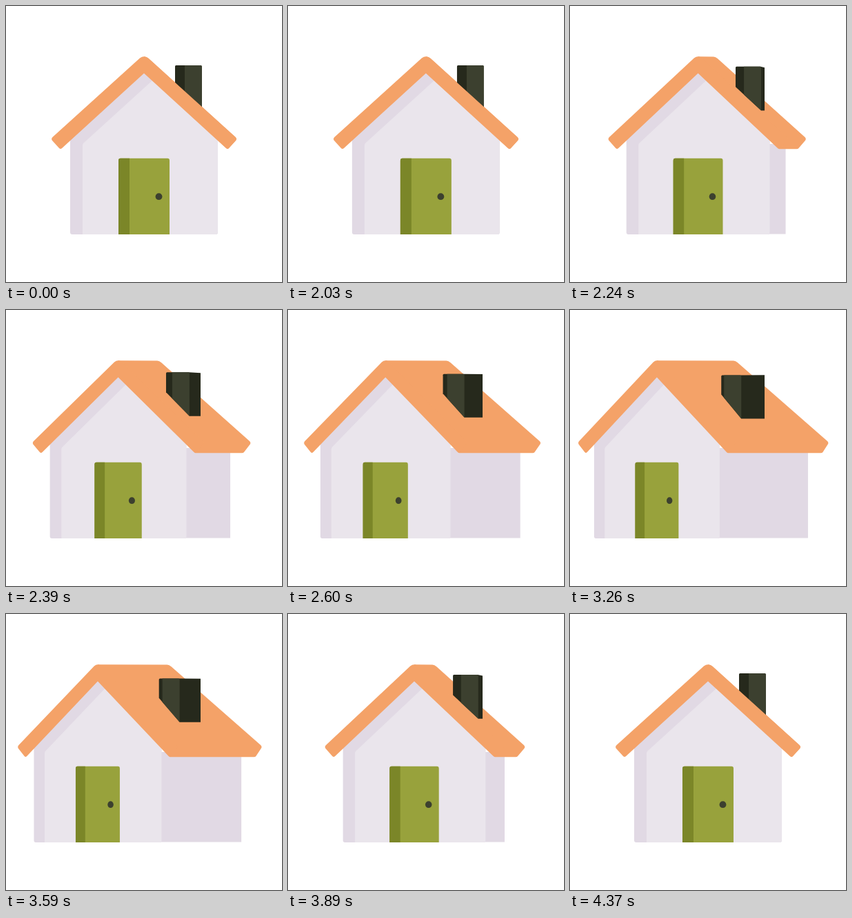
An HTML page that plays this animation: 400x400 px, repeating every 4400 ms.

```html
<!DOCTYPE html>
<html>
<head>
<meta charset="utf-8">
<style>
  html, body { margin: 0; width: 100%; height: 100%; overflow: hidden; background: #fff; }
  svg { display: block; width: 100%; height: 100%; }
</style>
</head>
<body>
<svg viewBox="0 0 400 400">
  <path id="sideWall" fill="#e1d9e4"/>
  <path id="sideRoof" fill="#f4a268"/>
  <path id="chimneyDark" fill="#26291c"/>
  <path id="chimneyLight" fill="#3c402f"/>
  <g id="front">
    <path fill="#e1d9e4" d="M93 188L200 92L307 188V328Q307 331 304 331H96Q93 331 93 328Z"/>
    <path fill="#eae5ec" d="M111 331V202Q111 200 112.5 198.6L212 108L307 190V328Q307 331 304 331Z"/>
    <path fill="#98a23c" d="M163 331V224Q163 220.7 166 220.7H234Q237 220.7 237 224V331Z"/>
    <path fill="#7b8628" d="M163 331V224Q163 220.7 166 220.7H179V331Z"/>
    <circle fill="#3c402f" cx="221.5" cy="276.2" r="4.9"/>
    <path fill="#f4a268" d="M194 75.6Q200 71 206 75.6L332.5 190Q335 192.3 333 195L323 206Q321 208 318.8 206L200 97.5L81.2 206Q79 208 77 206L67 195Q65 192.3 67.5 190Z"/>
  </g>
</svg>
<script>
const LOOP = 4400, START = 2000, TURN = 1200;
const el = id => document.getElementById(id);
const draw = (id, d) => el(id).setAttribute('d', d);

// Cubic bezier easing with flat ends: control points (x1, 0) and (x2, 1)
function ease(x, x1, x2) {
  let lo = 0, hi = 1, s;
  for (let i = 0; i < 24; i++) {
    s = (lo + hi) / 2;
    const r = 1 - s;
    if (3 * r * r * s * x1 + 3 * r * s * s * x2 + s ** 3 < x) lo = s; else hi = s;
  }
  return s * s * (3 - 2 * s);
}

function turnAt(time) {
  const t = (time - START) / TURN;
  if (t <= 0) return 0;
  return t < 1 ? ease(t, 0.33, 0.2) : 1 - ease(t - 1, 0.8, 0.2);
}

function render(p) {
  const apex = 200 - 74.2 * p, scale = 1 - 0.15 * p;
  const frontX = x => apex + (x - 200) * scale;
  el('front').setAttribute('transform', `translate(${apex} 0) scale(${scale} 1) translate(-200 0)`);

  draw('sideWall', `M210 200H${304.7 + 40.3 * p}V330.5H210Z`);

  const ridge = 36 * p, tip = 40.5 * p, eave = 43.5 * p;
  draw('sideRoof', `M${apex} 73.3L${201 + ridge} 73.5Q${204 + ridge} 73.5 ${207 + ridge} 76.2
    L${332.5 + tip} 190Q${335 + tip} 192.3 ${333 + tip} 195
    L${323 + eave} 206Q${322 + eave} 207.3 ${320 + eave} 207.3
    L${frontX(321)} 207.3L${apex} 97.5Z`);

  const left = 245 - 25.8 * p, strip = 259 - 35.8 * p, corner = 284 - 35.8 * p;
  const top = 86 + 8.4 * p, sideTop = 88 + 6.3 * p;
  const leftFoot = 116 + 6.5 * p, foot = 150 + 7.4 * p;
  const stripFoot = leftFoot + (foot - leftFoot) * (strip - left) / (corner - left);
  draw('chimneyDark', `M${left} ${top + 1.5}Q${left} ${top} ${left + 1.5} ${top}H${corner - 1}
    L282 ${sideTop}V${foot}H${corner}L${left} ${leftFoot}Z`);
  draw('chimneyLight', `M${strip} ${top}H${corner - 1.5}Q${corner} ${top} ${corner} ${top + 1.5}
    V${foot}L${strip} ${stripFoot}Z`);
}

function tick() {
  render(turnAt(performance.now() % LOOP));
  requestAnimationFrame(tick);
}
tick();
</script>
</body>
</html>
```
